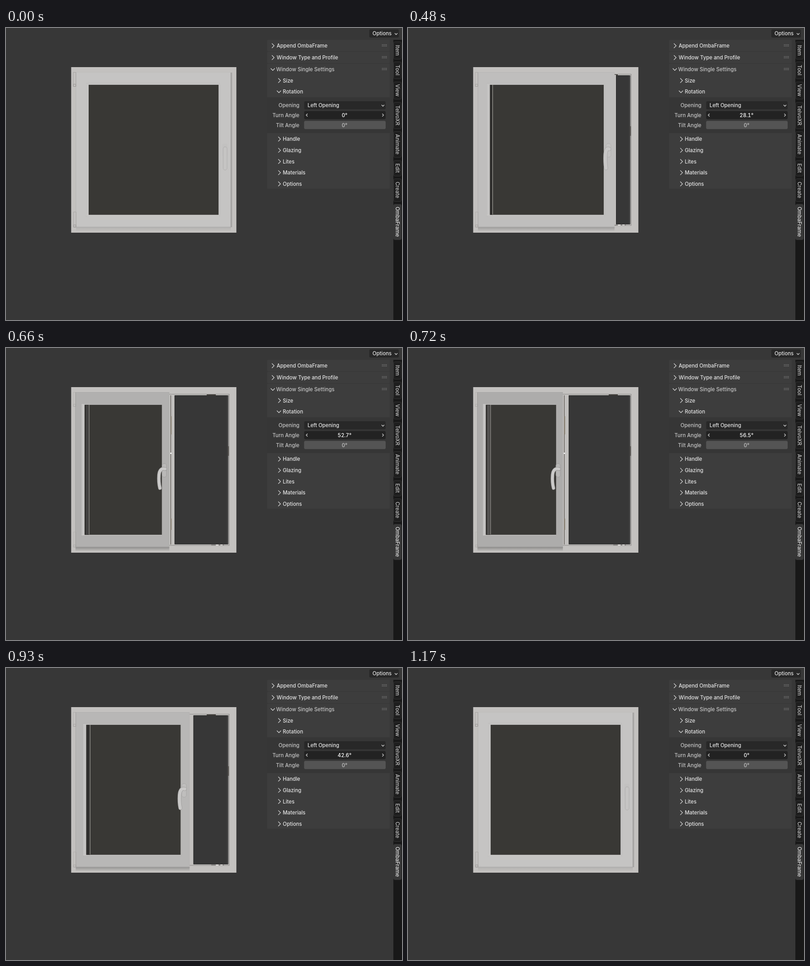
These frames come from a looping animation (872 by 642 pixels, 1260 ms). An HTML page with a canvas:

```html
<!DOCTYPE html>
<html lang="en">
<head>
<meta charset="utf-8">
<title>Window turn angle</title>
<style>
html, body { margin: 0; width: 100%; height: 100%; overflow: hidden; background: #373737; }
canvas, svg { position: absolute; left: 0; top: 0; }
text { font: 500 11.35px Inter, "Noto Sans", sans-serif; font-variant-numeric: tabular-nums; fill: #e4e4e4; }
.dim { fill: #c4c4c4; }
.mid { text-anchor: middle; }
.end { text-anchor: end; }
.line { fill: none; stroke: #d4d4d4; stroke-width: 1.3; }
</style>
</head>
<body>
<canvas id="view" width="872" height="642"></canvas>
<svg id="ui" width="872" height="642" viewBox="0 0 872 642"></svg>
<script>
const LOOP = 1260, STEP = 30, MAX = 58.2;
const c = document.getElementById('view').getContext('2d');
const ui = document.getElementById('ui');

// ---------- side panel ----------
const parts = [];
const box = (x, y, w, h, fill, r = 0, extra = '') =>
  parts.push(`<rect x="${x}" y="${y}" width="${w}" height="${h}" rx="${r}" fill="${fill}" ${extra}/>`);
const label = (x, y, s, cls = '', extra = '') =>
  parts.push(`<text x="${x}" y="${y}" class="${cls}" ${extra}>${s}</text>`);
const line = (d, extra = '') => parts.push(`<path class="line" d="${d}" ${extra}/>`);
const right = (x, y) => line(`M${x - 2.5} ${y - 5}l5 5l-5 5`);
const down = (x, y, w = 4.5) => line(`M${x - w} ${y - w / 2}l${w} ${w}l${w} ${-w}`);

function grip(y) {
  for (let i = 0; i < 8; i++) box(828 + (i % 4) * 3, y + (i >> 2) * 3, 1.3, 1.3, '#999');
}

function buildPanel() {
  box(800, 3, 65, 18, '#272727', 3);
  label(807, 16.2, 'Options');
  down(859, 13, 3);

  box(575, 26, 270, 25, '#3d3d3d', 2);
  box(575, 52, 270, 25.5, '#3d3d3d', 2);
  box(575, 78.5, 270, 275, '#3d3d3d', 2);
  box(575, 152.5, 270, 78.5, '#363636');
  right(588, 39);
  label(596, 43.2, 'Append OmbaFrame');
  right(588, 65);
  label(596, 69.2, 'Window Type and Profile');
  down(587.5, 91);
  label(595, 95.2, 'Window Single Settings', 'dim');
  [36, 62, 88].forEach(grip);

  right(602, 115.5);
  label(609.5, 119.7, 'Size');
  down(601, 140);
  label(609.5, 144.2, 'Rotation');
  ['Handle', 'Glazing', 'Lites', 'Materials', 'Options'].forEach((s, i) => {
    const y = 244.3 + i * 24.6;
    right(602, y);
    label(609.5, y + 4.1, s);
  });

  ['Opening', 'Turn Angle', 'Tilt Angle'].forEach((s, i) => label(646, 174 + i * 21.8, s, 'dim end'));
  box(656.5, 161, 179.5, 18, '#282828', 3);
  box(656.5, 182.5, 179.5, 18, '#222', 3);
  box(656.5, 204.3, 179.5, 18, '#545454', 3);
  label(664, 174, 'Left Opening');
  down(830, 170.5, 3);
  line('M664 188.5l-3 3l3 3M828.5 188.5l3 3l-3 3', 'stroke-width="1.6"');
  label(745.5, 195.7, '0°', 'mid', 'id="turn" style="fill:#fff"');
  label(745.5, 217.5, '0°', 'dim mid');

  box(853, 26, 19, 616, '#181818');
  const tabs = [['Item', 30, 69], ['Tool', 74, 112], ['View', 118, 157], ['TelvoXR', 163, 222],
    ['Animate', 227, 285], ['Edit', 291, 326], ['Create', 331, 382], ['OmbaFrame', 387, 466]];
  tabs.forEach(([s, a, b], i) => {
    const on = i === 7;
    box(853.5, a + .5, 17, b - a - 1, on ? '#373737' : '#1e1e1e', 3, `stroke="${on ? '#373737' : '#343434'}"`);
    label(0, 0, s, on ? 'mid' : 'dim mid', `transform="translate(857.5 ${(a + b) / 2 - .5}) rotate(90)"`);
  });
  ui.innerHTML = parts.join('');
}

// ---------- motion ----------
const KEYS = [[60, 0], [210, 1], [330, 6.9], [480, 28.1], [660, 52.7], [780, MAX],
  [870, MAX], [990, 20.2], [1080, 4], [1140, 0], [1260, 0]];
const rate = i => (KEYS[i + 1][1] - KEYS[i][1]) / (KEYS[i + 1][0] - KEYS[i][0]);

function slope(i) {
  if (i < 1 || i > KEYS.length - 2) return 0;
  const a = rate(i - 1), b = rate(i);
  return a * b > 0 ? 2 * a * b / (a + b) : 0;
}

// smooth curve through the keys without overshoot
function angleAt(t) {
  if (t <= KEYS[0][0]) return 0;
  let i = 0;
  while (i < KEYS.length - 2 && t > KEYS[i + 1][0]) i++;
  const [t0, a] = KEYS[i], [t1, b] = KEYS[i + 1];
  const h = t1 - t0, s = (t - t0) / h, r = 1 - s;
  return a * r * r * (1 + 2 * s) + b * s * s * (3 - 2 * s)
    + h * s * r * (slope(i) * r - slope(i + 1) * s);
}

// ---------- window ----------
const rect = (x0, y0, x1, y1, fill) => {
  c.fillStyle = fill;
  c.fillRect(x0, y0, x1 - x0, y1 - y0);
};
const edge = (x0, y0, x1, y1, color, w = 1) => {
  c.strokeStyle = color;
  c.lineWidth = w;
  c.strokeRect(x0, y0, x1 - x0, y1 - y0);
};
const grey = v => `rgb(${v},${v - 1},${v - 2})`;

function drawFrame() {
  rect(143.5, 86, 507.3, 450, '#c3c1bf');
  rect(157, 101, 492, 434.5, '#8d8c8a');
  rect(157, 102, 491, 433.5, '#c0bebc');
  rect(157, 104, 489.5, 431.5, '#373737');
  rect(157, 104, 489, 105, '#272727');
  rect(157, 430, 489, 431.5, '#2b2b2b');
  rect(487, 104, 489.5, 431, '#474747');
  rect(442, 102, 462, 104.5, '#45423e');
  rect(488, 216, 490.5, 237, '#45423e');
  rect(452, 432, 480, 434.5, '#8b8987');
  rect(462, 432, 468, 434.5, '#e0dedc');
  rect(472, 432, 477, 434, '#e0dedc');
}

function drawHinges(k) {
  c.globalAlpha = 1 - .6 * k;
  edge(148.5, 97.5, 154, 128.5, '#a5a3a1');
  edge(149, 404.5, 154.5, 438, '#a9a7a5');
  edge(149, 123.5, 153.5, 128.5, '#999795');
  edge(149, 433, 154, 437.5, '#999795');
  c.globalAlpha = 1;
}

function drawSash(deg) {
  const a = deg * Math.PI / 180, cos = Math.cos(a), sin = Math.sin(a), k = deg / MAX;
  // u runs across the sash, z is depth behind its front
  const px = (u, z = 0) => 149 + u * cos + (z + 1.2) * sin;
  const L = px(5), R = px(346), inL = px(33, 4), inR = px(319), back = px(339, 20);
  const tone = 197 - 25 * k * k;

  if (back > R + .5) {
    rect(R - 2, 103, back, 432.5, '#c2c0be');
    rect(back, 105, back + 1, 431, '#262626');
    if (k > .75) {
      rect(R + 2.5, 104, R + 3.8, 432, '#5b5751');
      rect(R + 2, 230, R + 5, 233, '#eee');
      rect(R + 3, 150, R + 5, 190, '#8d8475');
      rect(R + 3, 375, R + 5, 400, '#8d8475');
    }
  }

  const fall = c.createLinearGradient(0, 438, 0, 447);
  fall.addColorStop(0, `rgba(70,70,70,${.12 + .35 * sin})`);
  fall.addColorStop(1, 'rgba(70,70,70,0)');
  rect(L, 438, R, 447, fall);
  if (deg < 12) {
    const side = c.createLinearGradient(R, 0, R + 4, 0);
    side.addColorStop(0, 'rgba(80,80,80,.4)');
    side.addColorStop(1, 'rgba(80,80,80,0)');
    rect(R, 98, R + 4, 438, side);
  }

  rect(L, 97, R, 438, grey(tone));
  rect(L, 97, R, 98, grey(tone - 7));
  rect(L - .5, 97, L + .5, 438, grey(tone - 14));
  rect(R - 1, 98, R, 438, grey(tone - 10 * (1 - k)));
  rect(L, 437, R, 438.3, grey(tone - 24));

  // glazing bead, its lines fading as the sash opens
  const rimL = px(27.5), rimR = px(322), bead = 1 - k;
  rect(rimL, 121, rimR, 415, grey(tone - 9 * bead));
  rect(rimL + 1, 122, rimR - 1, 415, grey(tone + bead));
  rect(rimL, 123, inL, 412, grey(197));
  rect(inL, 124, inR + .6, 411, grey(tone - 18 * bead));
  rect(rimL, 410.5, inR, 412, '#cbc9c7');
  rect(inL, 125, inR, 410.7, '#393835');
  if (deg > 3) {
    const end = px(33, 16), mid = inL + (end - inL) * .25;
    rect(inL, 125, end, 410.7, '#2e2d2b');
    rect(mid, 126, end - 1.5, 410, grey(45 + 50 * Math.pow(k, 8)));
    rect(end - .4, 125, end + .8, 410, '#a5a39f');
  }
  drawHandle(px, cos, tone, k);
}

function drawHandle(px, cos, tone, k) {
  const x = px(333, -4), w = 2.2 * cos + 3.5;
  c.fillStyle = grey(tone - 3 + 14 * k);
  c.strokeStyle = grey(tone - 10 - 6 * k);
  c.lineWidth = 1;
  c.beginPath();
  c.roundRect(x - w, 254, 2 * w, 30, 4.5);
  c.fill();
  if (k > .2) c.stroke();

  const at = (z, y) => [px(333.5, -z), y];
  const width = 5.5 + 4 * cos;
  c.lineCap = c.lineJoin = 'round';
  [[width, tone - 24], [width - 1.8, 197 + 6 * k]].forEach(([w, v]) => {
    c.lineWidth = w;
    c.strokeStyle = grey(v);
    c.beginPath();
    c.moveTo(...at(2, 266));
    c.quadraticCurveTo(...at(17, 263), ...at(19, 279));
    c.quadraticCurveTo(...at(20.5, 295), ...at(16.5, 308));
    c.stroke();
  });
}

buildPanel();
const turn = document.getElementById('turn');

function tick() {
  const t = performance.now() % LOOP;
  const deg = angleAt(Math.floor(t / STEP) * STEP);
  c.clearRect(0, 0, 872, 642);
  drawFrame();
  drawSash(deg);
  drawHinges(deg / MAX);
  turn.textContent = +deg.toFixed(1) + '°';
  requestAnimationFrame(tick);
}
tick();
</script>
</body>
</html>
```
